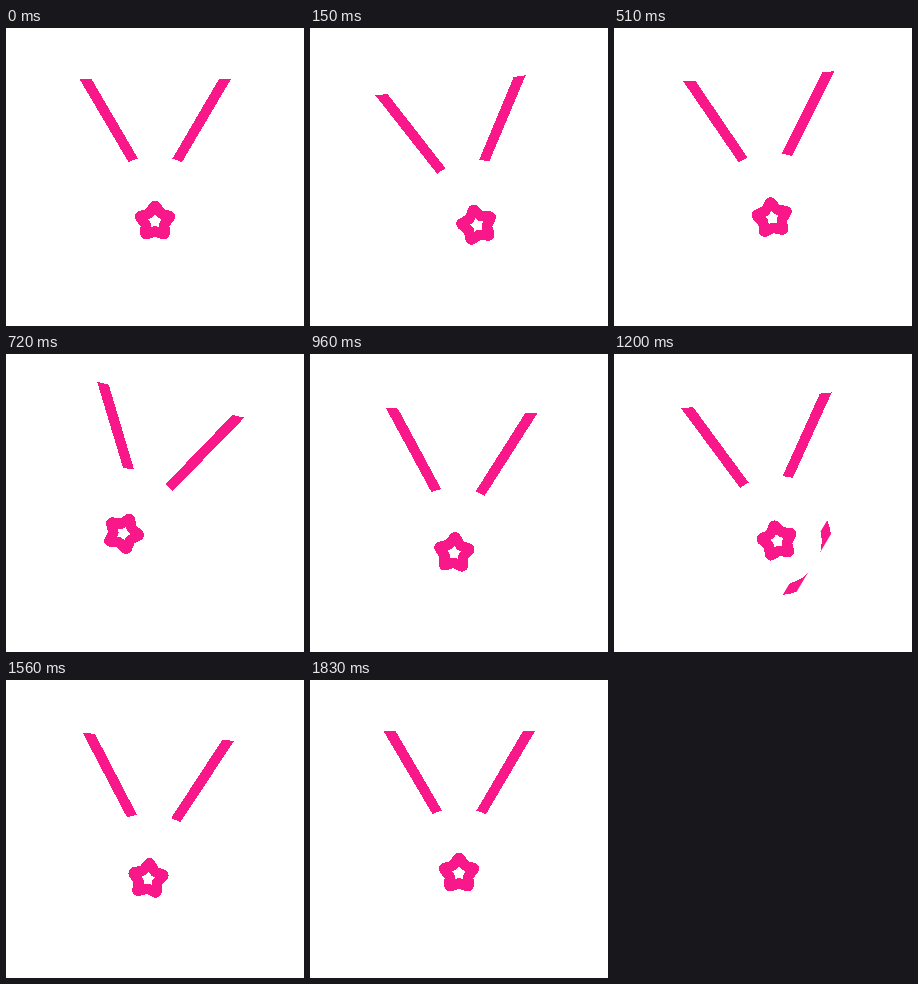
An HTML page that plays this animation: 298x298 px, repeating every 2.25 s.

```html
<!DOCTYPE html>
<html lang="en">
<head>
<meta charset="utf-8">
<title>Swinging medal</title>
<style>
  html, body { margin: 0; width: 100%; height: 100%; overflow: hidden; background: #fff; }
  svg { display: block; width: 100vw; height: 100vh; shape-rendering: crispEdges; }
</style>
</head>
<body>
<svg viewBox="0 0 298 298" fill="#f91889" stroke="none">
  <clipPath id="glint">
    <rect class="bar" x="-5.2" y="-70" width="10.4" height="140"/>
    <rect class="bar" x="-5.2" y="-70" width="10.4" height="140"/>
  </clipPath>
  <g id="ribbon">
    <path d="M73.5 51H85.5L143.4 150H131.9Z"/>
    <path d="M225 51H213L155.1 150H166.6Z"/>
  </g>
  <!-- the white disc hides the lower ribbon ends -->
  <g id="medal">
    <circle r="65" fill="#fff"/>
    <g clip-path="url(#glint)" transform="rotate(30.8)">
      <circle r="49.2" fill="none" stroke="#f91889" stroke-width="9.8"/>
    </g>
    <g id="star">
      <polygon id="body" stroke="#f91889" stroke-width="12" stroke-linejoin="round"/>
      <polygon id="hole" fill="#fff"/>
    </g>
  </g>
</svg>
<script>
const LOOP = 2250, STEP = 30, REST = 1830;
const PIVOT = { x: 149, y: 116 };
const ARM = 77.4;     // pivot to the medal centre
const TILT = 1.77;    // the medal swings wider than the ribbon
const GAP = 33.5;     // distance between the two glint bars
const SPEED = 0.6;    // glint, px per ms

// [time, value] at each turning point
const SWING = [[0, 0], [320, -17], [740, 13.9], [1140, -6.6], [1520, 3], [REST, 0]];
const BOB = [[0, 0], [300, 11.7], [640, -9.6], [950, 5.8], [1190, -5], [1540, 6], [1740, -2], [REST, 0]];
const GLINTS = [298, 1082]; // when the leading bar crosses the centre

const el = id => document.getElementById(id);
const bars = document.querySelectorAll('.bar');

function starPoints(outer, inner) {
  return Array.from({ length: 10 }, (_, i) => {
    const r = i % 2 ? inner : outer, a = i * Math.PI / 5;
    return (r * Math.sin(a)).toFixed(2) + ',' + (-r * Math.cos(a)).toFixed(2);
  }).join(' ');
}

function ease(keys, t) {
  const i = keys.findIndex(k => k[0] > t);
  if (i < 0) return keys[keys.length - 1][1];
  const [t0, a] = keys[i - 1], [t1, b] = keys[i];
  return a + (b - a) * (1 - Math.cos(Math.PI * (t - t0) / (t1 - t0))) / 2;
}

function draw(t) {
  const swing = ease(SWING, t), bob = ease(BOB, t), tilt = swing * TILT;
  const a = tilt * Math.PI / 180;
  const x = PIVOT.x - ARM * Math.sin(a);
  const y = PIVOT.y + bob + ARM * Math.cos(a);
  el('ribbon').setAttribute('transform', `translate(0 ${bob}) rotate(${swing} ${PIVOT.x} ${PIVOT.y})`);
  // only the star turns; the glint keeps its slant
  el('medal').setAttribute('transform', `translate(${x} ${y})`);
  el('star').setAttribute('transform', `rotate(${tilt})`);
  const lead = SPEED * (t - (t < 700 ? GLINTS[0] : GLINTS[1]));
  bars.forEach((b, i) => b.setAttribute('transform', `translate(${lead - i * GAP} 0)`));
}

function tick() {
  const t = performance.now() % LOOP;
  draw(Math.min(REST, Math.floor(t / STEP) * STEP));
  requestAnimationFrame(tick);
}

el('body').setAttribute('points', starPoints(14.9, 8.8));
el('hole').setAttribute('points', starPoints(7, 4.6));
tick();
</script>
</body>
</html>
```
